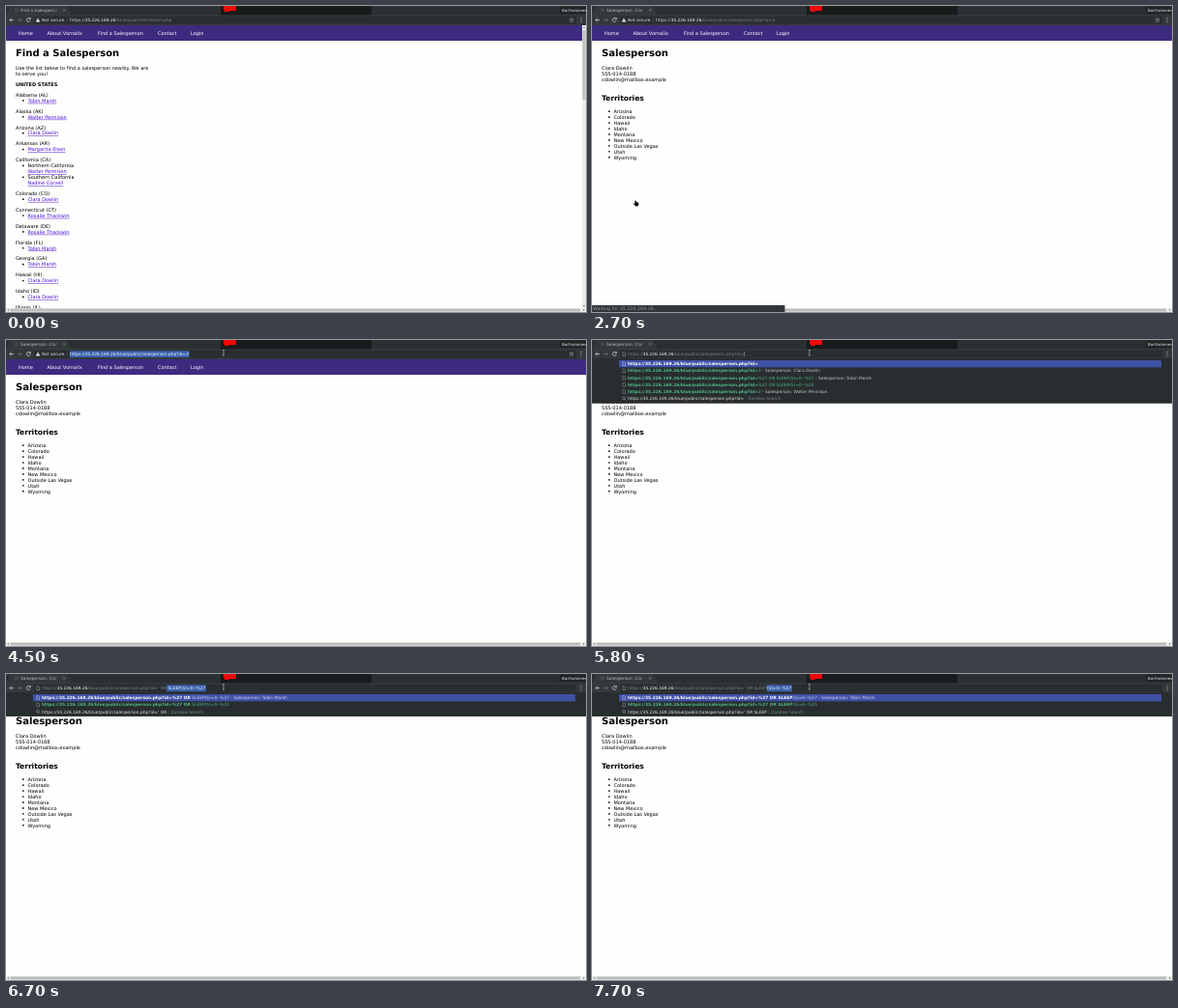
Animation of 600 by 317 pixels, one loop 8000 ms. Source, as an HTML page:

```html
<!DOCTYPE html>
<html lang="en">
<head>
<meta charset="utf-8">
<title>Find a Salesperson</title>
<style>
  html, body { margin: 0; width: 100%; height: 100%; overflow: hidden; background: #fefefc; }
  svg { display: block; width: 100%; height: 100%; }
  text { font-family: "DejaVu Sans", sans-serif; white-space: pre; text-rendering: geometricPrecision; }
</style>
</head>
<body>
<svg id="stage" viewBox="0 0 600 317">
  <defs>
    <linearGradient id="tabFade"><stop offset=".8" stop-color="#33393b" stop-opacity="0"/><stop offset="1" stop-color="#33393b"/></linearGradient>
  </defs>
</svg>
<script>
const LOOP = 8000, STEP = 100;
const BODY = 5, UI = 4.375, LINE = 5.9375;
const svg = document.getElementById('stage');

function add(parent, tag, attrs = {}) {
  const node = document.createElementNS('http://www.w3.org/2000/svg', tag);
  for (const key in attrs) node.setAttribute(key, attrs[key]);
  parent.appendChild(node);
  return node;
}
const group = parent => add(parent, 'g');
const rect = (parent, x, y, width, height, fill, rx = 0) =>
  add(parent, 'rect', { x, y, width, height, fill, rx });
const path = (parent, d, stroke, width = .7, fill = 'none') =>
  add(parent, 'path', { d, stroke, 'stroke-width': width, fill });
function label(parent, x, y, str, size = BODY, fill = '#000', more = {}) {
  const node = add(parent, 'text', { x, y, 'font-size': size, fill, ...more });
  node.textContent = str;
  return node;
}
// runs: [text, colour, bold]
function setRuns(node, runs) {
  node.replaceChildren();
  for (const [str, fill, bold] of runs)
    add(node, 'tspan', { fill, 'font-weight': bold ? 700 : 400 }).textContent = str;
}
const show = (node, on) => node.setAttribute('visibility', on ? 'visible' : 'hidden');
const bold = { 'font-weight': 700 };
const bullet = (parent, y) => add(parent, 'circle', { cx: 17.8, cy: y - 1.8, r: .85 });

// Pages
const [TOBIN, WALTER, CLARA, MARGARITA, NADINE, ROSALIE] =
  ['Tobin Marsh', 'Walter Pennison', 'Clara Dowlin', 'Margarita Elsen', 'Nadine Corvell', 'Rosalie Thackwin'];
const STATES = [
  ['Alabama (AL)', TOBIN], ['Alaska (AK)', WALTER], ['Arizona (AZ)', CLARA], ['Arkansas (AR)', MARGARITA],
  ['California (CA)', WALTER, NADINE], ['Colorado (CO)', CLARA], ['Connecticut (CT)', ROSALIE],
  ['Delaware (DE)', ROSALIE], ['Florida (FL)', TOBIN], ['Georgia (GA)', TOBIN],
  ['Hawaii (HI)', CLARA], ['Idaho (ID)', CLARA], ['Illinois (IL)'],
];

rect(svg, 0, 0, 600, 317, '#fefefc');
const listPage = group(svg), personPage = group(svg);

label(listPage, 10, 52, 'Find a Salesperson', 10, '#000', bold);
label(listPage, 10, 66, 'Use the list below to find a salesperson nearby. We are');
label(listPage, 10, 66 + LINE, 'to serve you!').textContent = 'to serve you!';
label(listPage, 10, 82.8, 'UNITED STATES', BODY, '#000', bold);
const link = (y, name) =>
  label(listPage, 22.5, y, name, BODY, '#4b10d8', { 'text-decoration': 'underline' });
let y = 93.8;
for (const [state, ...people] of STATES) {
  label(listPage, 10, y, state);
  people.forEach((name, i) => {
    y += LINE;
    bullet(listPage, y);
    if (people.length > 1) {
      label(listPage, 22.5, y, ['Northern', 'Southern'][i] + ' California');
      y += LINE;
    }
    link(y, name);
  });
  y += LINE + 5;
}

label(personPage, 10, 52, 'Salesperson', 10, '#000', bold);
[CLARA, '555-014-0188', 'cdowlin@mailbox.example'].forEach((str, i) => label(personPage, 10, 66 + i * LINE, str));
label(personPage, 10, 98.2, 'Territories', 7.5, '#000', bold);
['Arizona', 'Colorado', 'Hawaii', 'Idaho', 'Montana', 'New Mexico', 'Outside Las Vegas', 'Utah', 'Wyoming']
  .forEach((str, i) => {
    bullet(personPage, 111 + i * LINE);
    label(personPage, 22.5, 111 + i * LINE, str);
  });

// Navigation and scrollbars
rect(svg, 0, 20, 600, 16, '#3d2b80');
[['Home', 13], ['About Vornalix', 42.5], ['Find a Salesperson', 95], ['Contact', 157], ['Login', 191]]
  .forEach(([str, x]) => label(svg, x, 30.4, str, BODY, '#fff'));
rect(svg, 0, 313, 600, 4, '#ececea');
rect(svg, 4.5, 313.5, 589.5, 3, '#bdbdbb');
path(svg, 'M2.8 314l-1.4 1 1.4 1zM597.2 314l1.4 1-1.4 1z', 'none', 0, '#555');
const vertical = group(svg);
rect(vertical, 596, 20, 4, 293, '#ececea');
rect(vertical, 596.5, 25, 3, 72, '#bdbdbb');
path(vertical, 'M597 23l1-1.4 1 1.4zM597 310l1 1.4 1-1.4z', 'none', 0, '#555');

// Browser frame
rect(svg, 0, 0, 600, 20, '#33393b');
rect(svg, 0, 0, 600, 9, '#2a2f31');
path(svg, 'M1 9.2L4.5 .8H63L67 9.2z', '#41484a', .3, '#33393b');
rect(svg, 9, 2.3, 4, 4, '#43494b', .5);
const tabTitle = label(svg, 15, 6, '', UI, '#b9bdbe');
rect(svg, 15, 1, 41, 7, 'url(#tabFade)');
path(svg, 'M59 3.2l2.4 2.4m0-2.4l-2.4 2.4', '#9a9fa0', .5);
rect(svg, 222, 0, 156, 9.4, '#181a1b');
path(svg, 'M225 0H238V5H231.5L230 6H226V4H225z', 'none', 0, '#f00808');
rect(svg, 573, .5, 27, 7.5, '#202526', .6);
label(svg, 575, 5.9, 'Bartholomew', 4, '#e2e4e4', { textLength: '' }).removeAttribute('textLength');
path(svg, 'M8 14.5H3.8m2-2l-2 2 2 2', '#d5d8d8');
path(svg, 'M12 14.5h4.2m-2-2l2 2-2 2', '#70777a');
path(svg, 'M25 13.4a2 2 0 1 0 .1 1.8M25.3 12v1.8h-1.8', '#d5d8d8');
rect(svg, 29, 10.8, 561, 7.8, '#292e30', .6);
[12.3, 14.5, 16.7].forEach(cy => add(svg, 'circle', { cx: 595, cy, r: .55, fill: '#c8cccc' }));

const pageIcon = (parent, y, stroke) =>
  path(parent, `M31.8 ${y - 1.9}h1.8l1 1v2.8h-2.8z`, stroke, .45);

const idle = group(svg), editing = group(svg);
path(idle, 'M33 12.3l2.3 4.1h-4.6z', 'none', 0, '#e4e6e6');
rect(idle, 32.8, 13.7, .4, 1.3, '#292e30');
label(idle, 37, 16.1, 'Not secure', UI, '#dfe2e2');
rect(idle, 63.4, 12, .4, 5, '#60676a');
path(idle, 'M585 12.3l.65 1.4 1.5.2-1.1 1 .3 1.5-1.35-.7-1.35.7.3-1.5-1.1-1 1.5-.2z', '#d5d8d8', .4);
pageIcon(editing, 14.6, '#b9bdbe');

const selection = rect(svg, 0, 11.3, 0, 6.8, '#3a62b0');
const url = label(svg, 66, 16.1, '', UI);
const caret = rect(svg, 0, 12, .4, 5, '#eef0f0');

// Suggestions
const ROW = 7.25, MAX_ROWS = 6;
const dropdown = group(svg);
const panel = rect(dropdown, 0, 19.2, 600, 10, '#282d2f');
rect(dropdown, 28, 21, 561, 7.3, '#3f51a5');
const rows = Array.from({ length: MAX_ROWS }, (_, i) => {
  const box = group(dropdown), mid = 24.6 + i * ROW;
  const page = pageIcon(box, mid, i ? '#a5aaab' : '#e6e8f4');
  const lens = path(box, `M35 ${mid + 1.7}l-1.2-1.2a1.4 1.4 0 1 1 .1-.1`, '#c0c4c5', .5);
  return { box, page, lens, text: label(box, 37, mid + 1.6, '', UI) };
});

// Status bubble
const status = group(svg);
rect(status, 0, 310, 199.5, 7, '#30363a');
label(status, 1, 315.4, 'Waiting for 35.226.169.26...', 4.8, '#8d9394');

// Pointers
const hand = path(svg, 'M-.6 -2.6l.9-.2.7 1.9 1.7.4.7 1.2-.4 2.5-3 .2-2.3-2.6.6-.6.9.5z', '#fff', .2, '#000');
const arrow = path(svg, 'M0 0V5l1.2-1 .8 1.8.8-.4-.8-1.7h1.6z', '#fff', .25, '#000');
const beam = path(svg, 'M-1 -2.7h2M0 -2.7V2.7M-1 2.7h2', '#dfe2e2', .5);

const HOST = ['https://', '35.226.169.26'];
const PERSON = '/blue/public/salesperson.php?id=';
const BASE = HOST.join('') + PERSON;
const INJECT = ' OR SLEEP(5)=0--%27';
const GREEN = '#4fb584', WHITE = '#f4f5f5', GREY = '#7b8385';

// [time, x, y]
const MOVES = [[100, 420, 150], [500, 171, 92], [800, 168, 91], [1300, 47, 251], [1400, 47, 251], [1500, 55, 220],
  [1600, 55, 220], [1700, 58, 212], [1800, 45, 204], [2800, 45, 204], [3500, 225, 13.3], [8000, 225, 13.3]];
// [time, text after "id="]
const KEYS = [[5800, ''], [6000, "'"], [6300, "' "], [6500, "' O"], [6700, "' OR"], [6900, "' OR "],
  [7100, "' OR S"], [7200, "' OR SL"], [7300, "' OR SLE"], [7500, "' OR SLEE"], [7700, "' OR SLEEP"]];

function pointerAt(t) {
  let i = 0;
  while (i < MOVES.length - 2 && t >= MOVES[i + 1][0]) i++;
  const [t0, x0, y0] = MOVES[i], [t1, x1, y1] = MOVES[i + 1];
  const k = Math.max(0, Math.min(1, (t - t0) / (t1 - t0)));
  return [x0 + (x1 - x0) * k, y0 + (y1 - y0) * k];
}

function suggestions(typed) {
  const found = (tail, rest, title = '') =>
    [[BASE + tail, GREEN, true], [rest, GREEN], [title && ' - Salesperson: ' + title, '#c3c8c8']];
  const search = [[BASE + typed.trimEnd(), '#dfe2e2'], [' - Zandow Search', GREY]];
  if (!typed) return [
    found('', ''), found('', '3', CLARA), found('', '%27' + INJECT, TOBIN),
    found('', '%27' + INJECT.replace('%27', '%25')), found('', '2', WALTER), search];
  const done = typed.slice(1).trimEnd();
  const tail = '%27' + done, rest = INJECT.slice(done.length);
  const list = [found(tail, rest, TOBIN), found(tail, rest.replace('%27', '%25')), search];
  if (typed.endsWith(' ')) list.unshift(found(tail, ''));
  return list;
}

function drawAddress(t, onList, typed) {
  const isEditing = typed !== undefined;
  const selected = t >= 4100 && t < 5000;
  const completion = typed && !typed.endsWith(' ') ? INJECT.slice(typed.length - 1) : '';
  const tail = onList ? '/blue/public/territories.php' : PERSON + (isEditing ? typed : '3');
  const left = isEditing ? 37 : 66;
  url.setAttribute('x', left);
  setRuns(url, [
    [HOST[0], selected ? WHITE : isEditing ? GREY : '#d0d4d4'], [HOST[1], WHITE],
    [tail, selected ? WHITE : GREY], [completion, WHITE]]);

  const all = url.getComputedTextLength();
  const chars = HOST.join('').length + tail.length;
  const before = completion ? url.getSubStringLength(0, chars) : all;
  const from = selected ? left : left + before;
  selection.setAttribute('x', from);
  selection.setAttribute('width', selected ? all + .6 : completion ? all - before + .6 : 0);
  caret.setAttribute('x', left + before + .4);
  show(caret, isEditing ? !completion : t >= 5000 && t < 5600);
}

function drawDropdown(typed) {
  show(dropdown, typed !== undefined);
  const list = typed === undefined ? [] : suggestions(typed);
  panel.setAttribute('height', 3 + ROW * list.length);
  rows.forEach(({ box, page, lens, text }, i) => {
    const runs = list[i], last = i === list.length - 1;
    box.setAttribute('display', runs ? 'inline' : 'none');
    if (!runs) return;
    page.setAttribute('display', last ? 'none' : 'inline');
    lens.setAttribute('display', last ? 'inline' : 'none');
    setRuns(text, i ? runs : runs.map(([str, , heavy]) => [str, heavy ? '#fff' : '#d3d8f2', heavy]));
  });
}

function draw(t) {
  const onList = t < 2300;
  const typed = KEYS.filter(([at]) => t >= at).pop()?.[1];
  show(listPage, onList);
  show(vertical, onList);
  show(personPage, !onList);
  show(idle, typed === undefined);
  show(editing, typed !== undefined);
  show(status, t >= 2000 && t < 2900);
  tabTitle.textContent = onList ? 'Find a Salesperso' : 'Salesperson: Clar';
  drawAddress(t, onList, typed);
  drawDropdown(typed);

  const [x, py] = pointerAt(t);
  const kind = t < 100 ? null : py < 20 ? beam : t >= 1300 && t < 2900 ? hand : arrow;
  for (const pointer of [hand, arrow, beam]) {
    show(pointer, pointer === kind);
    pointer.setAttribute('transform', `translate(${x} ${py})`);
  }
}

const start = performance.now();
let drawn = -1;
function tick(now) {
  const t = Math.floor(Math.max(0, now - start) % LOOP / STEP) * STEP;
  if (t !== drawn) draw(drawn = t);
  requestAnimationFrame(tick);
}
tick(start);
</script>
</body>
</html>
```
